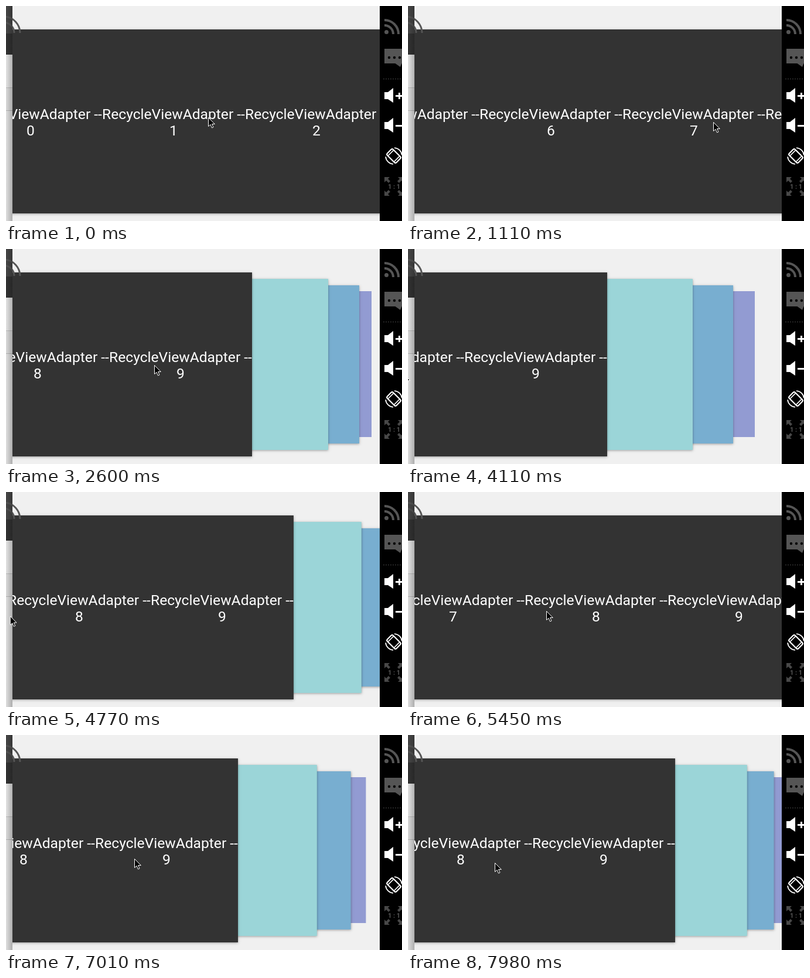
An HTML page with a canvas for the animation above (8000 ms loop, 676 px wide and 367 px high).

```html
<!DOCTYPE html>
<html>
<head>
<meta charset="utf-8">
<style>
html, body { margin: 0; width: 100%; height: 100%; overflow: hidden; background: #000; }
canvas { display: block; }
</style>
</head>
<body>
<canvas id="stage" width="676" height="367"></canvas>
<script>
const ctx = document.getElementById('stage').getContext('2d');
const LOOP = 8000, LEFT = 11, RIGHT = 638, ITEM = 244, COUNT = 10;

const smooth = p => p * p * (3 - 2 * p);
const out = p => 1 - (1 - p) ** 3;
const linear = p => p;

// time, right end of the list, pointer tip x and y, easing towards this key
const keys = [
  [0, 2360, 345, 190],
  [60, 2360, 345, 190],
  [300, 2130, 190, 196, linear],
  [840, 1330, 440, 198, out],
  [870, 1320, 450, 198],
  [1110, 1098, 521, 198, out],
  [1200, 1098, 521, 198],
  [1450, 840, 265, 200, smooth],
  [1680, 638, 330, 200, linear],
  [1990, 638, 471, 198, smooth],
  [2600, 420, 253, 198, smooth],
  [2650, 420, 253, 198],
  [2780, 412, 245, 199, smooth],
  [3120, 638, 265, 206, smooth],
  [3380, 638, 290, 210, smooth],
  [4110, 340, -8, 213, smooth],
  [4220, 340, -8, 213],
  [4420, 480, -6, 212, smooth],
  [4660, 480, -6, 212],
  [5450, 687, 236, 203, smooth],
  [5480, 687, 236, 203],
  [5700, 730, 279, 204, smooth],
  [6150, 550, 99, 208, smooth],
  [6450, 638, 461, 210, smooth],
  [7010, 396, 219, 211, smooth],
  [7070, 387, 210, 212, linear],
  [7130, 387, 210, 212],
  [7440, 325, 148, 218, smooth],
  [7680, 325, 148, 218],
  [7980, 456, 148, 218, smooth],
  [8000, 456, 148, 218]
];

function pose(t) {
  const i = keys.findIndex(k => k[0] > t);
  const a = keys[i - 1], b = keys[i];
  const p = (b[4] || linear)((t - a[0]) / (b[0] - a[0]));
  return [1, 2, 3].map(n => a[n] + (b[n] - a[n]) * p);
}

function rect(color, x, y, w, h) {
  ctx.fillStyle = color;
  ctx.fillRect(x, y, w, h);
}

function poly(color, ...pts) {
  ctx.fillStyle = color;
  ctx.beginPath();
  for (let i = 0; i < pts.length; i += 2) ctx.lineTo(pts[i], pts[i + 1]);
  ctx.closePath();
  ctx.fill();
}

function arc(color, width, x, y, r, from, to) {
  ctx.strokeStyle = color;
  ctx.lineWidth = width;
  ctx.beginPath();
  ctx.arc(x, y, r, from, to);
  ctx.stroke();
}

function dot(color, x, y, r) {
  ctx.fillStyle = color;
  ctx.beginPath();
  ctx.arc(x, y, r, 0, 7);
  ctx.fill();
}

function cards(end) {
  ctx.save();
  ctx.beginPath();
  ctx.rect(LEFT, 0, RIGHT - LEFT, 367);
  ctx.clip();
  rect('#f0f0f0', LEFT, 0, RIGHT - LEFT, 367);

  const pull = end - 420;
  const card = (color, right, y, h) => {
    ctx.shadowColor = 'rgba(0,0,0,.35)';
    ctx.shadowBlur = 4;
    ctx.shadowOffsetY = 1;
    rect(color, LEFT - 20, y, right - LEFT + 20, h);
    ctx.shadowColor = 'transparent';
  };
  if (end < RIGHT) {
    rect('#929bd2', LEFT, 72, 624 + pull * .4 - LEFT, 249);
    card('#78aed0', 603 + pull * .6, 62, 270);
    card('#9bd5d8', 550 + pull * .8, 51, 292);
  }
  card('#333', Math.min(end, RIGHT + 20), 40, 314);

  ctx.font = '24.6px Roboto, sans-serif';
  ctx.textAlign = 'center';
  ctx.fillStyle = '#fff';
  for (let i = 0; i < COUNT; i++) {
    const x = end - ITEM * (COUNT - i - .5);
    if (x < -ITEM || x > RIGHT + ITEM) continue;
    ctx.fillText('RecycleViewAdapter --', x, 192.5);
    ctx.fillText(i, x, 221);
  }
  ctx.restore();
}

function leftStrip() {
  rect('#464646', 0, 0, LEFT, 47);
  arc('#555', 3, -4, 46, 18, -1.5, 0);
  arc('#555', 3, -4, 46, 28, -1.5, 0);
  rect('#333', 0, 47, LEFT, 36);
  rect('#e2e2e2', 0, 83, LEFT, 96);
  rect('#d9d9d9', 0, 140, LEFT, 39);
  rect('#bbb', 0, 139, LEFT, 1);
  rect('#b4b4b4', 0, 178, LEFT, 1);
  rect('#dedede', 0, 179, LEFT, 188);
  const shade = ctx.createLinearGradient(0, 0, LEFT, 0);
  shade.addColorStop(0, 'rgba(0,0,0,0)');
  shade.addColorStop(1, 'rgba(0,0,0,.22)');
  rect(shade, 0, 0, LEFT, 367);
}

function speaker(y, plus) {
  poly('#fff', 646, y - 6, 652, y - 6, 661, y - 13, 661, y + 12, 652, y + 6, 646, y + 6);
  rect('#fff', 665, y - 1, 11, 3);
  if (plus) rect('#fff', 670, y - 5, 3, 11);
}

function toolbar() {
  const grey = '#555', dim = '#484848';
  rect('#000', RIGHT, 0, 38, 367);

  dot(grey, 649.5, 44.5, 3.5);
  arc(grey, 4, 646, 48, 15, -Math.PI / 2, 0);
  arc(grey, 4, 646, 48, 24, -Math.PI / 2, 0);

  rect(grey, 646, 73, 30, 25);
  poly(grey, 663, 97, 676, 97, 673, 104);
  for (const x of [654, 663, 672]) dot('#000', x, 88, 2.2);
  for (let x = 644; x < 676; x += 4) rect('#444', x, 124, 2, 1);

  speaker(153, true);
  speaker(204, false);

  ctx.save();
  ctx.translate(662, 256);
  arc('#fff', 1.8, 0, 0, 14, -1.5, -.1);
  arc('#fff', 1.8, 0, 0, 14, 1.65, 3.05);
  ctx.rotate(-Math.PI / 4);
  ctx.lineWidth = 2.2;
  ctx.beginPath();
  ctx.roundRect(-7, -11, 14, 22, 2.5);
  ctx.stroke();
  rect('#fff', -6, -8, 12, 1.5);
  rect('#fff', -6, 6.5, 12, 1.5);
  ctx.restore();

  for (const sx of [-1, 1]) for (const sy of [-1, 1]) {
    ctx.save();
    ctx.translate(662, 308);
    ctx.scale(sx, sy);
    poly(dim, 16, 16, 7, 16, 10, 13, 6, 9, 9, 6, 13, 10, 16, 7);
    ctx.restore();
  }
  ctx.font = 'bold 11px Roboto, sans-serif';
  ctx.textAlign = 'center';
  ctx.fillStyle = '#555';
  ctx.fillText('1 : 1', 662.5, 312);
}

function pointer(x, y) {
  ctx.save();
  ctx.translate(x + .5, y + .5);
  poly('#000', 0, 0, 0, 15, 3.5, 11.8, 6, 17.5, 8.5, 16.4, 6, 11, 10.8, 11);
  ctx.strokeStyle = '#fff';
  ctx.lineWidth = 1;
  ctx.stroke();
  ctx.restore();
}

function draw(now) {
  const [end, x, y] = pose(now % LOOP);
  cards(end);
  leftStrip();
  toolbar();
  pointer(x, y);
}

let start;
function tick(now) {
  start ??= now;
  draw(now - start);
  requestAnimationFrame(tick);
}
draw(0);
requestAnimationFrame(tick);
</script>
</body>
</html>
```
